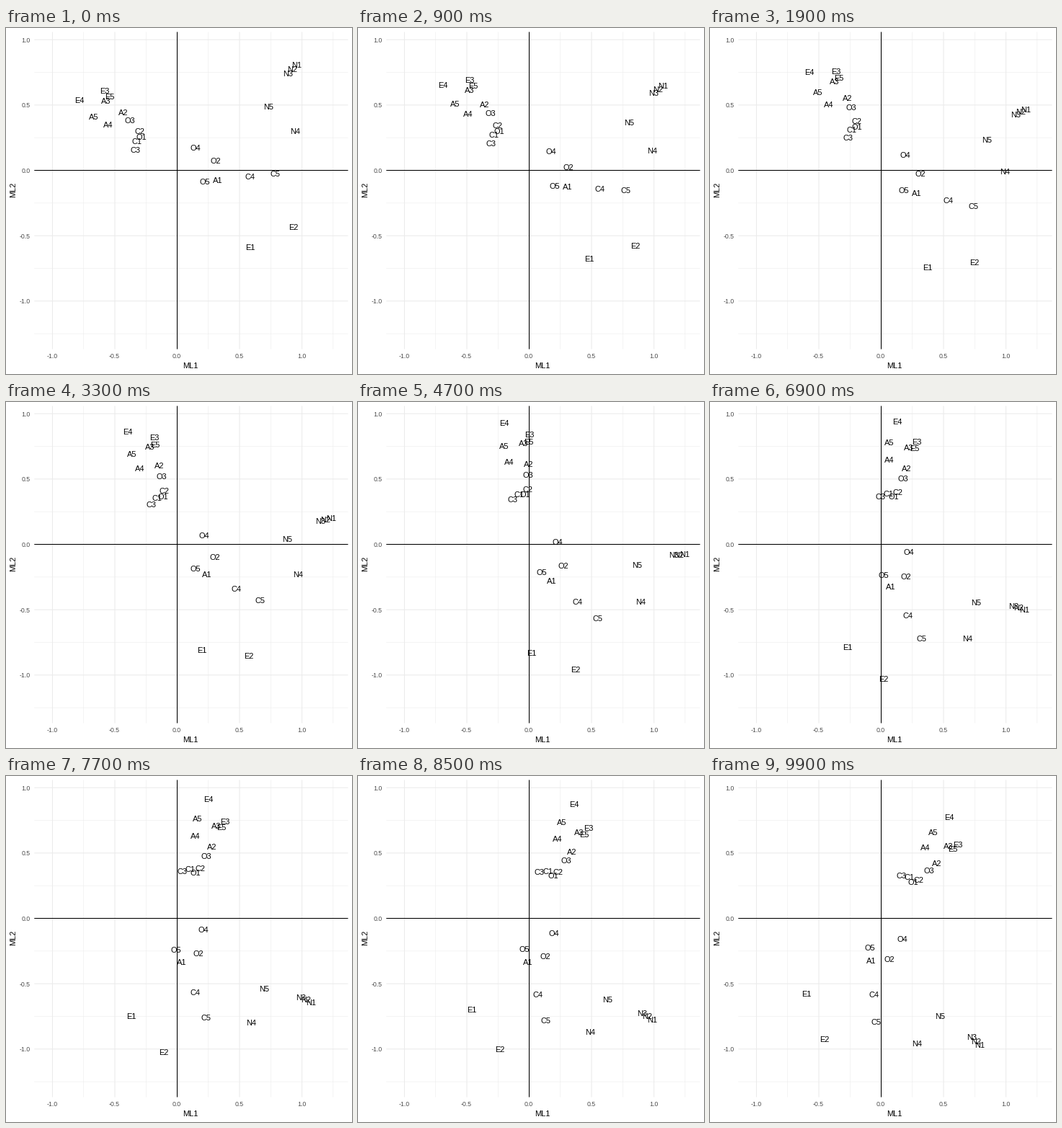
Recreate the animation shown at these times as a matplotlib script. Size 480x480 px, loop 10 s.

```python
import numpy as np
import matplotlib.pyplot as plt
from matplotlib.animation import FuncAnimation

SIZE, DPI = 480, 72
FRAMES, INTERVAL = 100, 100
STEP = np.pi / 99          # clockwise turn per pose

# Panel box and data-to-pixel scale
LEFT, RIGHT, TOP, BOTTOM = 39.3, 474.5, 5.5, 445.5
X0, SX = 237.5, 173.05
Y0, SY = 197.5, 181.3

# Items evenly spaced from start to end of a line; a dot skips a step
CHAINS = [
    ("E3 . E5 . . . . . A2 . . O3 . . . C2", -.577 + .609j, -.300 + .300j),
    ("O5 . A1 . . . . C4 . . . C5", .222 - .084j, .792 - .026j),
    ("E4 A3 . . . . . N5", -.782 + .538j, .737 + .488j),
    ("A5 A4 . C1", -.666 + .409j, -.320 + .225j),
    ("N1 N2 N3", .958 + .808j, .894 + .744j),
    ("E1 E2", .588 - .588j, .933 - .435j),
    ("O4 O2", .152 + .173j, .309 + .073j),
    ("O1 C3", -.284 + .257j, -.330 + .158j),
    ("N4", .951 + .303j, .951 + .303j),
]

plt.rcParams["font.family"] = "Liberation Sans"
fig = plt.figure(figsize=(SIZE / DPI, SIZE / DPI), dpi=DPI, facecolor="white")
ax = fig.add_axes([0, 0, 1, 1])
ax.set(xlim=(0, SIZE), ylim=(SIZE, 0))
ax.axis("off")


def px(x):
    return X0 + SX * x


def py(y):
    return Y0 - SY * y


def rules(xs, ys, color, width):
    style = dict(colors=color, linewidths=width, snap=False)
    ax.vlines([px(x) for x in xs], TOP, BOTTOM, **style)
    ax.hlines([py(y) for y in ys], LEFT, RIGHT, **style)


def write(x, y, text, size=11, color="black", ha="center", **kw):
    return ax.text(x, y, text, fontsize=size, color=color, ha=ha,
                   va="baseline", **kw)


def place(chain, start, end):
    slots = chain.split()
    return {name: z for name, z in zip(slots, np.linspace(start, end, len(slots)))
            if name != "."}


major = np.arange(-1, 1.1, 0.5)
minor = np.arange(-0.75, 1, 0.5)
rules([*minor, 1.25], [-1.25, *minor], "#ebebeb", 0.53)
rules(major, major, "#ebebeb", 1.07)
rules([0], [0], "black", 1.07)

for v in major:
    tick = f"{v:.1f}"
    write(px(v) - 0.6, 458, tick, 8.8, "#4d4d4d")
    write(33.5, py(v) + 3.4, tick, 8.8, "#4d4d4d", "right")

write((LEFT + RIGHT) / 2 - 1, 472, "ML1")
write(13.6, (TOP + BOTTOM) / 2 - 1.5, "ML2", rotation=90, rotation_mode="anchor")

items = {}
for chain in CHAINS:
    items.update(place(*chain))
points = np.array(list(items.values()))
labels = [write(0, 0, name, 11.04) for name in items]


def update(frame):
    pose = (frame + 1) // 2
    turned = points * np.exp(-1j * STEP * pose)
    for label, z in zip(labels, turned):
        label.set_position((px(z.real) - 0.6, py(z.imag) + 4))
    return labels


anim = FuncAnimation(fig, update, frames=FRAMES, interval=INTERVAL,
                     repeat=True, repeat_delay=0, blit=False)
plt.show()
```
